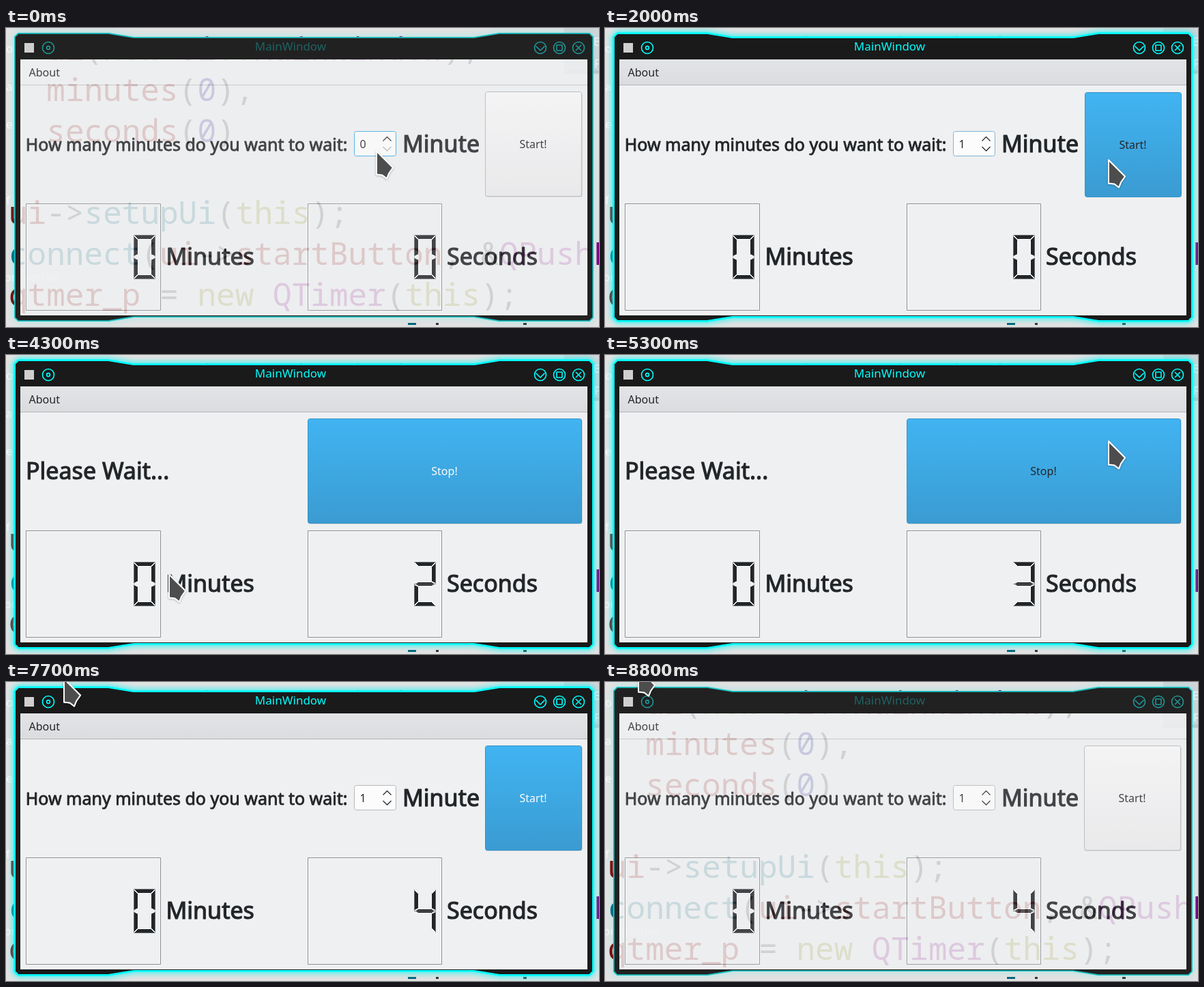
An HTML page with a canvas that plays this animation: 869x438 px, repeating every 9 s.

```html
<!DOCTYPE html>
<html lang="en">
<head>
<meta charset="utf-8">
<title>Timer window</title>
<style>
html, body { margin: 0; width: 100%; height: 100%; overflow: hidden; background: #e2e2e2; }
canvas { display: block; }
</style>
</head>
<body>
<canvas id="stage" width="869" height="438"></canvas>
<script>
const W = 869, H = 438, LOOP = 9000, STEP = 100;
const INK = '#232629', BLUE = '#3daee9', GRAY = '#b7b8ba';
const SANS = '"Noto Sans", "Open Sans", sans-serif';
const MONO = '"Noto Sans Mono", "DejaVu Sans Mono", monospace';
const ctx = document.getElementById('stage').getContext('2d');

// Moments of the story, in ms
const ACTIVATE = 700, PRESS_START = 1900, COUNT = 2100, PRESS_STOP = 6600, STOPPED = 6800, LEAVE = 8500;

// Pointer moves: from time, to time, to x, to y
const HOME = [543, 180];
const MOVES = [
  [0, 100, 270, 384], [100, 200, 643, 300], [200, 300, 578, 163], [400, 500, 565, 158],
  [1300, 1800, 738, 193], [2200, 2500, 556, 322], [2800, 3100, 275, 330], [3100, 3400, 231, 321],
  [4000, 4300, 239, 321], [4600, 5000, 730, 112], [5000, 5100, 738, 126],
  [7000, 7700, 85, -5], [7700, 8200, 49, -20]
];

const clamp = v => Math.max(0, Math.min(1, v));
const lerp = (a, b, k) => a + (b - a) * k;

function pointerAt(t) {
  let [x, y] = HOME;
  for (const [t0, t1, toX, toY] of MOVES) {
    const k = clamp((t - t0) / (t1 - t0));
    x = lerp(x, toX, k);
    y = lerp(y, toY, k);
  }
  return { x: Math.round(x), y: Math.round(y) };
}

function text(g, s, x, y, font, color, align = 'left') {
  g.font = font;
  g.fillStyle = color;
  g.textAlign = align;
  g.fillText(s, x, y);
}

// Emboldened towards the right
function label(s, x, y, size) {
  x += size / 34;
  text(ctx, s, x, y, `${size}px ${SANS}`, INK);
  ctx.strokeStyle = INK;
  ctx.lineWidth = size / 29;
  ctx.lineJoin = 'round';
  ctx.strokeText(s, x, y);
}

function trace(points, g = ctx) {
  g.beginPath();
  points.forEach(([x, y]) => g.lineTo(x, y));
}

function line(points, color, width = 1) {
  trace(points);
  ctx.strokeStyle = color;
  ctx.lineWidth = width;
  ctx.stroke();
}

// Chevron centred on x, with its tip at y; a negative depth points up
function chevron(x, y, half, depth, color, width) {
  line([[x - half, y - depth], [x, y], [x + half, y - depth]], color, width);
}

function box(x, y, w, h, fill, stroke) {
  ctx.beginPath();
  ctx.roundRect(x, y, w, h, 3);
  ctx.fillStyle = fill;
  ctx.fill();
  if (!stroke) return;
  ctx.strokeStyle = stroke;
  ctx.lineWidth = 1;
  ctx.stroke();
}

function vertical(y0, y1, a, b) {
  const g = ctx.createLinearGradient(0, y0, 0, y1);
  g.addColorStop(0, a);
  g.addColorStop(1, b);
  return g;
}

// Code editor that lies behind the window
const CODE = [
  '  ui(new Ui::MainWindow),', '  minutes(0),', '  seconds(0)', '',
  'ui->setupUi(this);', 'connect(ui->startButton, &QPushB', 'qtmer_p = new QTimer(this);'
];
const SYNTAX = [
  [/^(ui|minutes|seconds|startButton|qtmer_p)$/, '#800000'],
  [/^(setupUi|connect)$/, '#00677c'],
  [/^(new|this)$/, '#808000'],
  [/^[QMU]\w+$/, '#800080'],
  [/^\d$/, '#000080'],
  [/./, '#333333']
];

function makeScene() {
  const c = document.createElement('canvas');
  c.width = W;
  c.height = H;
  const g = c.getContext('2d');
  const fill = (color, ...rect) => { g.fillStyle = color; g.fillRect(...rect); };
  fill('#e2e2e2', 0, 0, W, H);
  fill('#d3d4d8', 818, 0, 51, 62);
  fill('#c4c6cb', 818, 62, 51, 5);
  const faint = (s, x, y) => text(g, s, x, y, `17px ${SANS}`, 'rgba(255,255,255,.8)');
  faint('B', 861, 26);
  faint('F', 862, 58);
  ['o', 'a', 'e'].forEach((s, i) => faint(s, 0, 36 + 55.5 * i));
  faint('f', 0, 258);
  faint('properties', -3, 371);
  CODE.forEach((row, i) => {
    for (const m of row.matchAll(/\w+|\W+/g)) {
      const color = SYNTAX.find(([rule]) => rule.test(m[0]))[1];
      text(g, m[0], 4 + m.index * 27.65, 47 + 60 * i, `46px ${MONO}`, color);
    }
  });
  fill('#00677c', 589, 432, 12, 3);
  fill('#333333', 630, 432, 4, 3);
  fill('#333333', 758, 432, 5, 3);
  return c;
}

// One corner of the window outline, mirrored to the other three
const CORNER = [[13, 13], [18, 8], [150, 8], [187, 14]];
const flipX = ([x, y]) => [873 - x, y], flipY = ([x, y]) => [x, 437 - y];
const TOP = [...CORNER, ...CORNER.map(flipX).reverse()];
const OUTLINE = [...TOP, ...TOP.map(flipY).reverse()];

function framePath() {
  trace(OUTLINE);
  ctx.closePath();
}

function drawFrame(lit) {
  const shade = (r, gb) => `rgb(${lerp(r, 0, lit)},${lerp(gb, 255, lit)},${lerp(gb, 255, lit)})`;
  const cyan = shade(31, 150), edge = shade(25, 195);
  ctx.save();
  ctx.lineJoin = 'round';
  ctx.shadowColor = `rgba(0,245,245,${0.65 + 0.35 * lit})`;
  ctx.shadowBlur = 9;
  ctx.strokeStyle = edge;
  ctx.lineWidth = 2 + lit;
  framePath();
  ctx.stroke();
  if (lit > 0.3) ctx.stroke();
  ctx.restore();
  framePath();
  ctx.fillStyle = lit < 0.5 ? '#212121' : '#1a1a1a';
  ctx.fill();
  ctx.strokeStyle = edge;
  ctx.lineWidth = 1.5 + 0.5 * lit;
  ctx.stroke();

  text(ctx, 'MainWindow', 417, 33, `17px ${SANS}`, shade(31, 98), 'center');
  ctx.fillStyle = '#cfcfcf';
  ctx.fillRect(27, 22, 14, 14);
  const ring = (x, r) => {
    ctx.beginPath();
    ctx.arc(x, 29, r, 0, 7);
    ctx.strokeStyle = cyan;
    ctx.lineWidth = 1.6;
    ctx.stroke();
  };
  [62, 783, 811, 839].forEach(x => ring(x, 8.5));
  ring(62, 2.4);
  chevron(783, 33, 6.5, 6.5, cyan, 1.6);
  ctx.strokeRect(807, 25, 8, 8);
  line([[835, 25], [843, 33]], cyan, 1.6);
  line([[843, 25], [835, 33]], cyan, 1.6);
}

function drawButton(s, x, w, { focus, hover, down }) {
  const d = down ? 1 : 0, y = 93 + d;
  x += d;
  if (!down) box(x + 0.5, y + 1.5, w, 153, 'rgba(0,0,0,.18)');
  const fill = focus ? vertical(y, y + 154, '#41b4f2', '#3a9bd1') : vertical(y, y + 154, '#f7f7f8', '#eaeaec');
  box(x + 0.5, y + 0.5, w - 1, 153, fill, focus ? '#3593c8' : hover ? BLUE : GRAY);
  text(ctx, s, x + w / 2 - 0.5, 176 + d, `16px ${SANS}`, focus && !hover ? '#fcfcfc' : INK, 'center');
}

function drawSpin(value, border, selected, upHot) {
  box(510.5, 151.5, 61, 36, '#fcfcfc', border);
  if (selected) {
    ctx.fillStyle = BLUE;
    ctx.fillRect(518, 159, 11, 23);
  }
  text(ctx, value, 518.5, 176, `16px ${SANS}`, selected ? '#fff' : INK);
  chevron(558.5, 159.5, 6, -6, upHot ? BLUE : INK, 1.2);
  chevron(558.5, 180, 6, 6, value ? INK : '#b4b6b8', 1.2);
}

// Seven segments in a cell of 31 x 64; the first two points of each are its outer edge
const CAP = [[0, 0], [31, 0], [25, 6], [6, 6]];
const SIDE = [[0, 1], [0, 31], [6, 28], [6, 7]];
const BAR = [[31, 32], [0, 32], [6, 29], [25, 29], [31, 32], [25, 35], [6, 35], [0, 32]];
const mirrorX = ([x, y]) => [31 - x, y], mirrorY = ([x, y]) => [x, 64 - y];
const SEGMENTS = [
  CAP, SIDE, SIDE.map(mirrorX), BAR,
  SIDE.map(mirrorY), SIDE.map(mirrorX).map(mirrorY), CAP.map(mirrorY)
];
const DIGITS = ['012456', '25', '02346', '02356', '1235'];

function drawDigit(n, x) {
  ctx.save();
  ctx.translate(x + 0.5, 303.5);
  for (const id of DIGITS[n]) {
    const points = SEGMENTS[id];
    trace(points);
    ctx.fillStyle = INK;
    ctx.fill();
    line([...points.slice(1), points[0]], '#fcfcfc');
    line(points.slice(0, 2), '#6a6d70');
  }
  ctx.restore();
}

function drawLcd(n, x, w, digitX) {
  line([[x + 1.5, 412], [x + 1.5, 258.5], [x + w - 2, 258.5]], '#fbfbfb');
  ctx.strokeStyle = '#8b8e91';
  ctx.strokeRect(x + 0.5, 257.5, w - 1, 156);
  line([[x + w - 1.5, 258], [x + w - 1.5, 412.5], [x + 1, 412.5]], '#f8f8f8');
  drawDigit(n, digitX);
}

const ARROW = [[0, 0.5], [0, 34.5], [8.5, 35.5], [15, 40.5], [18, 33], [24, 24.5]];

function drawPointer({ x, y }) {
  ctx.save();
  ctx.translate(x, y);
  trace(ARROW);
  ctx.closePath();
  ctx.lineJoin = 'round';
  ctx.shadowColor = 'rgba(0,0,0,.3)';
  ctx.shadowBlur = 3;
  ctx.shadowOffsetY = 1;
  ctx.fillStyle = '#4d4d4d';
  ctx.strokeStyle = '#fcfcfc';
  ctx.lineWidth = 2;
  ctx.stroke();
  ctx.shadowColor = 'transparent';
  ctx.fill();
  ctx.stroke();
  ctx.restore();
}

function drawContent(t, tip) {
  const active = t >= ACTIVATE && t < LEAVE;
  const counting = t >= COUNT && t < STOPPED;
  const seconds = Math.floor(Math.max(0, Math.min(t, STOPPED) - 2300) / 1000);
  const inside = (x, y, w, h) => tip.x >= x && tip.x < x + w && tip.y >= y && tip.y < y + h;

  ctx.fillStyle = '#eff0f1';
  ctx.fillRect(21, 46, 831, 375);
  if (active) {
    ctx.fillStyle = vertical(46, 83, '#e3e4e6', '#dbdcdf');
    ctx.fillRect(21, 46, 831, 37);
  }
  ctx.fillStyle = active ? '#b4b6b8' : '#c2c4c5';
  ctx.fillRect(21, 83, 831, 1);
  text(ctx, 'About', 33.5, 71, `16px ${SANS}`, INK);

  if (counting) {
    label('Please Wait...', 28, 182, 34);
    drawButton('Stop!', 442, 402, { focus: true, hover: inside(442, 93, 402, 154), down: t >= PRESS_STOP });
  } else {
    const selected = t >= ACTIVATE && t < PRESS_START;
    const pressed = t >= PRESS_START && t < COUNT;
    const over = inside(510, 151, 62, 37);
    const border = selected || over ? BLUE : pressed ? '#7fb6d3' : GRAY;
    label('How many minutes do you want to wait:', 28, 180, 25);
    drawSpin(t < ACTIVATE ? 0 : 1, border, selected, over && tip.x > 548 && tip.y < 170);
    label('Minute', 580, 182, 34);
    drawButton('Start!', 702, 142, {
      focus: active && t >= PRESS_START, hover: inside(702, 93, 142, 154), down: pressed
    });
  }
  drawLcd(0, 29, 198, 187);
  label('Minutes', 233.5, 347, 34);
  drawLcd(seconds, 442, 197, 598);
  label('Seconds', 645, 347, 34);
}

// The scene shows through the content of an inactive window
function showThrough(alpha) {
  const area = [21, 46, 831, 375];
  ctx.globalAlpha = alpha;
  ctx.drawImage(scene, ...area, ...area);
  ctx.globalAlpha = 1;
}

// 0 = window in the background, 1 = window active
function activity(t) {
  if (t < ACTIVATE) return 0;
  return t < LEAVE ? clamp((t - ACTIVATE + STEP) / 600) : 1 - clamp((t - LEAVE + STEP) / 400);
}

const scene = makeScene();

function draw(now) {
  const t = Math.floor((now % LOOP) / STEP) * STEP;
  const level = activity(t), tip = pointerAt(t);
  ctx.drawImage(scene, 0, 0);
  drawFrame(clamp(level * 1.25));
  drawContent(t, tip);
  showThrough(0.16 * (1 - level));
  drawPointer(tip);
}

const start = performance.now();
function tick() {
  draw(performance.now() - start);
  requestAnimationFrame(tick);
}
tick();
</script>
</body>
</html>
```
